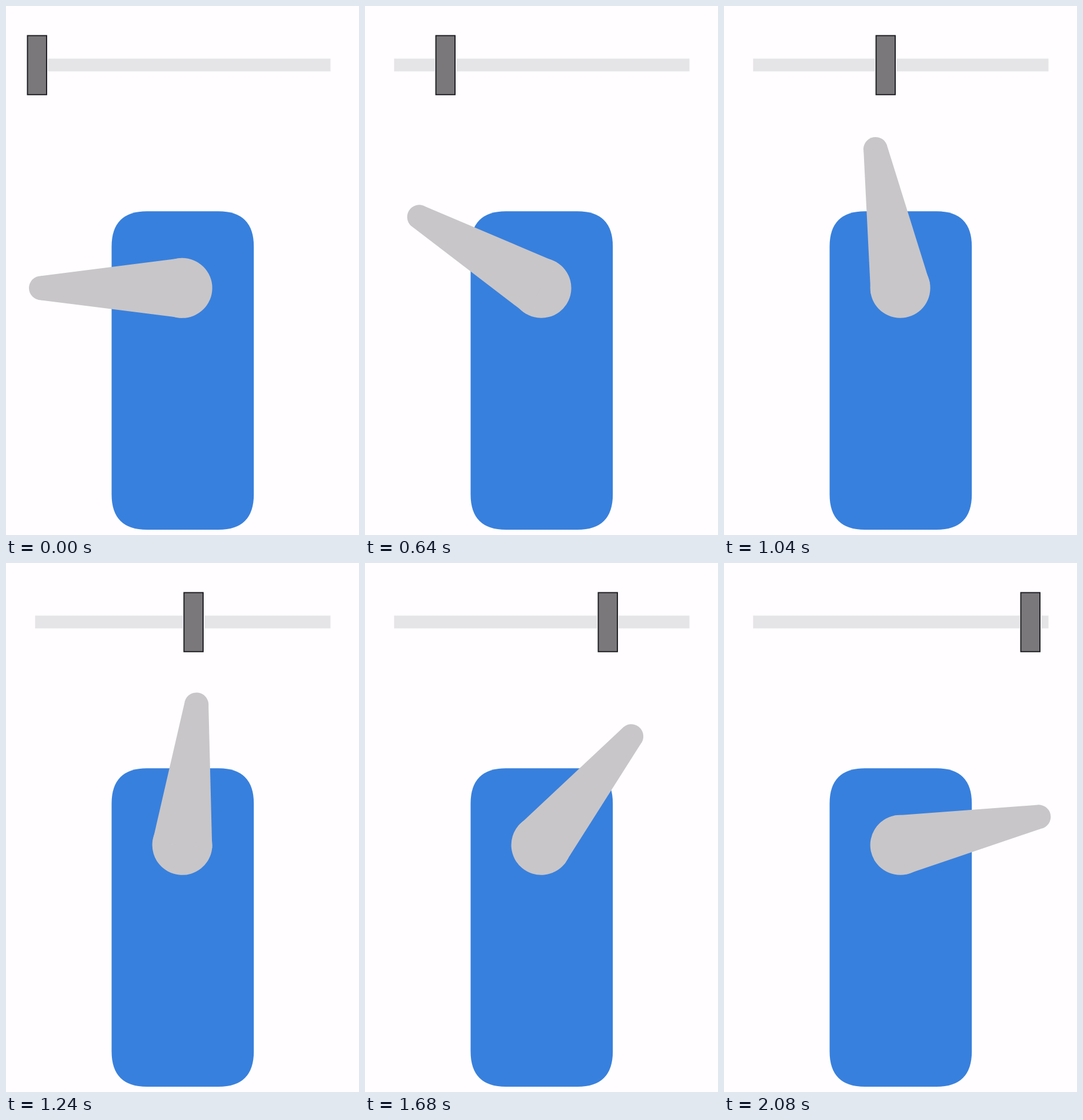
These frames come from a looping animation (600 by 900 pixels, 2120 ms). An HTML page:

```html
<!DOCTYPE html>
<html lang="en">
<head>
<meta charset="utf-8">
<title>Slider and lever</title>
<style>
  html, body { margin: 0; width: 100%; height: 100%; overflow: hidden; background: #fffdff; }
  svg { display: block; width: 100vw; height: 100vh; }
</style>
</head>
<body>
<svg viewBox="0 0 600 900">
  <rect x="49.5" y="89.5" width="502" height="21.8" fill="#e5e4e6"/>
  <g id="knob">
    <rect x="34.5" y="48.5" width="36.5" height="104" fill="#fffdff"/>
    <rect x="36.5" y="50.4" width="32.5" height="100.4" fill="#7a787a" stroke="#1c1b20" stroke-width="1.9"/>
  </g>
  <path fill="#3880dd" d="M239.5 349.2H361.2Q421.2 349.2 421.2 409.2V831Q421.2 891 361.2 891H239.5Q179.5 891 179.5 831V409.2Q179.5 349.2 239.5 349.2Z"/>
  <g id="lever" fill="#c8c6c9">
    <circle r="51"/>
    <circle cx="-240" r="20.6"/>
    <path d="M0-51L-240-20.6V20.6L0 51Z"/>
  </g>
</svg>
<script>
  const LOOP = 2120, STEP = 40;
  const knob = document.getElementById('knob');
  const lever = document.getElementById('lever');

  const easeIn = p => u => u ** p;
  const easeOut = p => u => 1 - (1 - u) ** p;
  const linear = u => u;

  // The drag starts slowly, pauses near the top, then speeds up again.
  const phases = [
    { start: 0, end: 560, from: 0, to: 56, ease: easeIn(1.57) },
    { start: 600, end: 1280, from: 68, to: 270, ease: easeOut(1.37) },
    { start: 1360, end: 1680, from: 270, to: 360, ease: easeIn(1.45) },
    { start: 1720, end: 2080, from: 360, to: 468, ease: linear }
  ];

  function travelAt(t) {
    const { start, end, from, to, ease } = phases.findLast(p => p.start < t) || phases[0];
    const u = Math.min(1, (t - start) / (end - start));
    const d = from + (to - from) * ease(u);
    return Math.round(d / 2) * 2; // the slider moves in 2 px notches
  }

  function draw() {
    const t = Math.floor((performance.now() % LOOP) / STEP) * STEP;
    const d = travelAt(t);
    knob.setAttribute('transform', `translate(${d} 0)`);
    lever.setAttribute('transform', `translate(299.6 479.8) rotate(${d * 0.36})`);
    requestAnimationFrame(draw);
  }
  draw();
</script>
</body>
</html>
```
